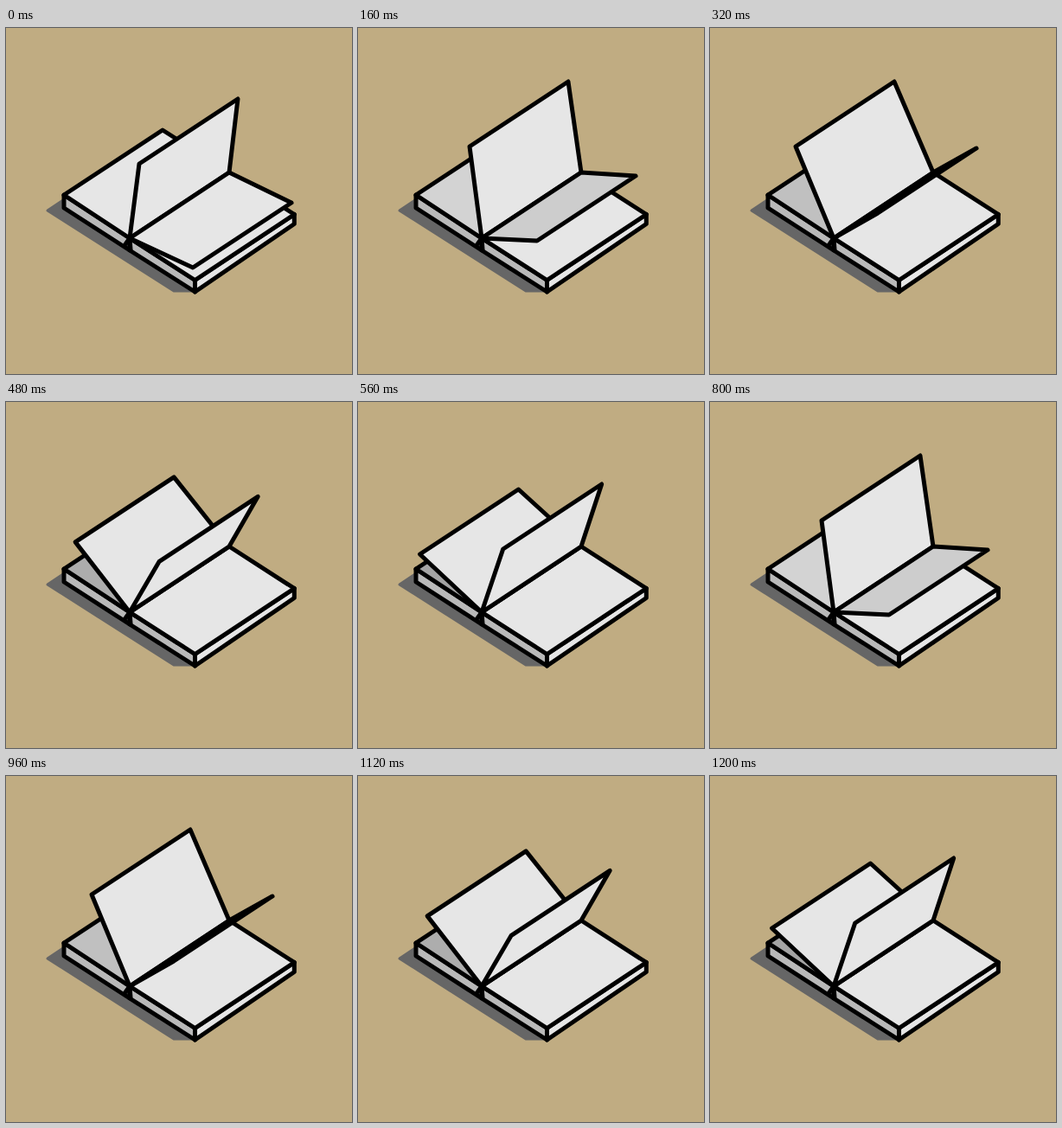
These frames come from a looping animation (400 px wide and 400 px high, 1280 ms). An HTML page:

```html
<!DOCTYPE html>
<html lang="en">
<head>
<meta charset="utf-8">
<title>Turning pages</title>
<style>
  html, body { margin: 0; width: 100%; height: 100%; overflow: hidden; background: #c0ac82; }
  svg { display: block; width: 100vw; height: 100vh; }
  .ink { fill: #e6e6e6; stroke: #000; stroke-width: 5; stroke-linejoin: round; stroke-linecap: round; }
  .side { fill: #b9b9b9; }
  .mark { fill: none; }
  .shadow { fill: #666; stroke: #666; stroke-width: 3; stroke-linejoin: round; }
</style>
</head>
<body>
<svg viewBox="0 0 400 400">
  <polygon class="shadow" points="48,211 66,199 218,304 194,304"/>
  <polygon class="ink side" points="67,193 143,243 143,257 67,208"/>
  <polygon class="ink side" points="143,243 218.5,291.5 218.5,305 143,257"/>
  <polygon class="ink" points="218.5,291.5 333.3,215.5 333.3,226.5 218.5,305"/>
  <polygon class="ink" id="left" points="67,193 181,118 258,167 143,243"/>
  <polygon class="ink" points="143,243 258,167 333.3,215.5 218.5,291.5"/>
  <polyline class="ink mark" points="138,250 143,243 144,256"/>
  <polygon class="ink" id="ahead"/>
  <polygon class="ink" id="behind"/>
</svg>
<script>
  const STEP = 80, STEPS = 8;
  const near = [143, 243], far = [258, 167], edge = [114, -75];

  // Key poses of a page's near corner: step, x and y from the spine
  const keys = [
    [0, 73, 34], [2, 64, 3], [4, 51, -29], [7, 24.7, -73],
    [8, 11, -86], [10, -14, -106], [12, -44, -106], [15, -71.5, -67]
  ];

  const byId = id => document.getElementById(id);
  const left = byId('left'), ahead = byId('ahead'), behind = byId('behind');
  const add = (a, b) => [a[0] + b[0], a[1] + b[1]];
  const grey = v => `rgb(${v},${v},${v})`;

  // Slope through the neighbours of key i
  function slope(i, axis) {
    const a = keys[Math.max(i - 1, 0)], b = keys[Math.min(i + 1, keys.length - 1)];
    return (b[axis] - a[axis]) / (b[0] - a[0]);
  }

  // Smooth cubic curve through the key poses
  function curve(t, axis) {
    const next = Math.max(1, keys.findIndex(key => key[0] >= t));
    const a = keys[next - 1], b = keys[next];
    const h = b[0] - a[0], u = (t - a[0]) / h, v = 1 - u;
    return v * v * (1 + 2 * u) * a[axis] + u * u * (1 + 2 * v) * b[axis]
      + h * u * v * (v * slope(next - 1, axis) - u * slope(next, axis));
  }

  function placePage(page, t) {
    const corner = add(near, [curve(t, 1), curve(t, 2)]);
    page.setAttribute('points', [near, corner, add(corner, edge), far].join(' '));
  }

  function draw(now) {
    const k = Math.floor(now / STEP) % STEPS;
    placePage(behind, k);
    placePage(ahead, k + STEPS);
    // The upper face darkens until the page is edge-on
    behind.style.fill = grey(k < 5 ? Math.round(230 - 12.5 * k) : 230);
    left.style.fill = grey(Math.round(230 - 9.5 * k));
  }

  let start;
  function tick(now) {
    start ??= now;
    draw(now - start);
    requestAnimationFrame(tick);
  }
  draw(0);
  requestAnimationFrame(tick);
</script>
</body>
</html>
```
